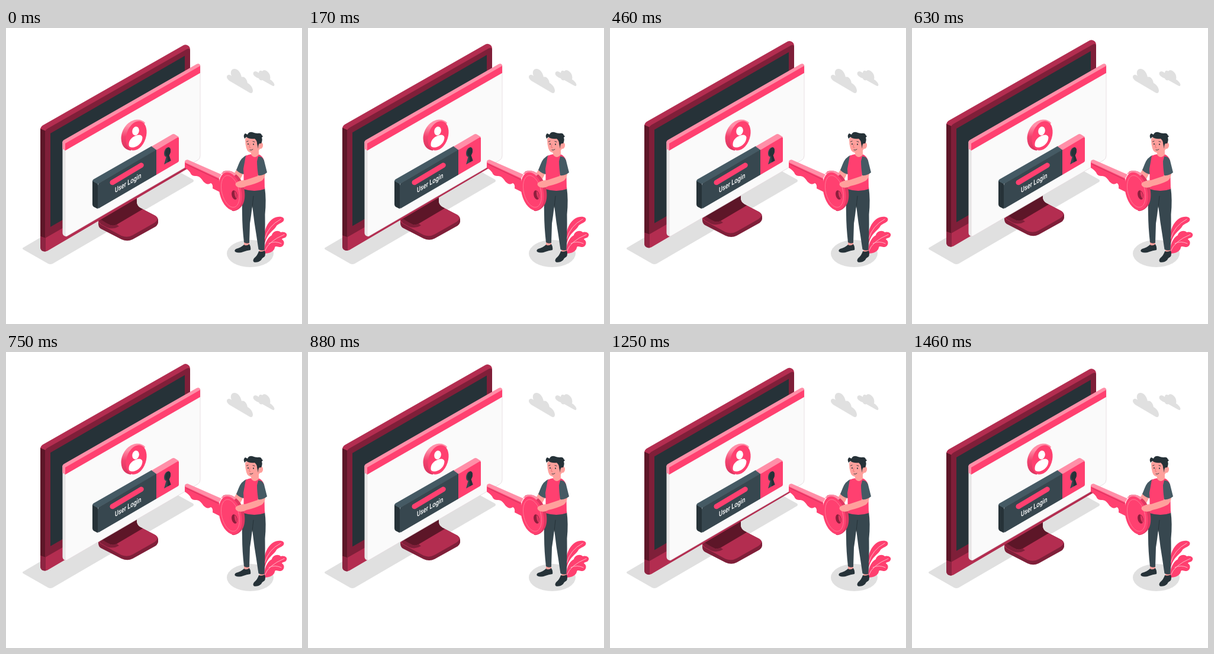
Recreate the animation shown at these times as an HTML page. Size 500 px wide and 500 px high, loop 1500 ms.

```html
<!DOCTYPE html>
<html lang="en">
<head>
<meta charset="utf-8">
<title>User Login</title>
<style>
html, body { margin: 0; width: 100%; height: 100%; overflow: hidden; background: #fff; }
svg { display: block; width: 100vw; height: 100vh; }
.pink { fill: #ff4070; }
.light { fill: #ff8fa8; }
.deep { fill: #b32d50; }
.frame { fill: #7f1f39; }
.wine { fill: #5d1628; }
.ink { fill: #263238; }
.slate { fill: #37474f; }
.grey { fill: #e0e0e0; }
.skin { fill: #ffa09c; }
.white { fill: #fff; }
.line { fill: none; stroke-linecap: round; stroke-linejoin: round; }
text { font: 500 12.5px Roboto, Arial, sans-serif; fill: #fff; }
</style>
</head>
<body>
<svg viewBox="0 0 500 500">
  <defs>
    <linearGradient id="rim" x1="0" y1="0" x2="0" y2="1">
      <stop offset=".2" stop-color="#ff8fa8"/>
      <stop offset=".55" stop-color="#f2426e"/>
      <stop offset="1" stop-color="#d9345f"/>
    </linearGradient>
  </defs>

  <!-- ground shadows -->
  <path class="grey" d="M29 371L58 354L278 235L316 256Q318 258 316 260L79 398Q75 400 71 398L29 374Q27 372.500 29 371Z"/>
  <ellipse class="grey" cx="412.500" cy="381" rx="39.500" ry="23"/>

  <!-- clouds -->
  <g class="grey">
    <path d="M374 80C376 78 379 79 381 81C378 74 381 68 387 69C393 70 397 77 398 83C402 81 407 86 408 93C413 95 417 101 417 106C417 110 414 111 411 109L377 89C373 86 372 82 374 80Z"/>
    <path d="M418 75C420 72 424 73 427 76C427 72 430 71 433 73C435 70 440 71 443 75C446 78 447 83 446 87C450 89 453 93 453.500 96C453 99 451 98 449 97L433 88C431 89 428 88 427 85C421 83 416 79 418 75Z"/>
  </g>

  <g id="monitor">
    <!-- stand -->
    <path class="frame" d="M156 325L221 288V297Q222 302 229 305L252 317Q257 320 257 325V329Q256 334 250 337L214 357Q205 361.500 195 357L160 339Q156 336 156 331Z"/>
    <path class="deep" d="M156 325L221 288V297Q222 302 229 305L252 317Q260 322 251 329L214 350Q205 355 195 351L160 332Q155 329 156 325Z"/>
    <path class="wine" d="M156 325L221 287V296Q222 302 231 306L187 332Q180 336 172 331L160 325Z"/>
    <path class="frame" d="M156 325L161 324L172 331Q180 336 187 332L191 335Q181 341 171 337L160 331Z"/>
    <!-- casing -->
    <path class="deep" d="M58 172Q58 167 62 164.500L300 29Q304 27 308 30Q311 32 311 37V235L70 376.500Q65 379 61 376Q58 374 58 370Z"/>
    <path class="wine" d="M58 170L67 174V355L58 352Z"/>
    <path d="M58 352L67 355V377.500Q58 378 58 370Z" fill="#8d2441"/>
    <path class="frame" d="M66 175Q66.500 172 70 170L305 36Q311 33 311 39V215L66 355Z"/>
    <path class="ink" d="M75 178L302 47V205L75 336Z"/>
  </g>

  <!-- window -->
  <path d="M95.500 192L101 194V352Q95.500 351 95.500 346Z" fill="#e9e9e9"/>
  <path d="M100 194L328 63V216Q328 221 324 223L103 351.500Q100 353 100 349Z" fill="#fafafa" stroke="#e3d9dc" stroke-width=".8"/>
  <path class="light" d="M95.500 192Q96 190 98 189L322 61Q326 59 328 62.500V66L100 207L95.500 204Z"/>
  <path class="pink" d="M100 195L328 64V76L100 207Z"/>

  <!-- account badge -->
  <path fill="url(#rim)" d="M194.500 187C194 173 205 157 219 155C226 154 231 156 235 160L211 207C203 206 195 201 194.500 187Z"/>
  <ellipse class="pink" cx="220" cy="182" rx="16.500" ry="25.500" transform="rotate(18 220 182)"/>
  <ellipse class="white" cx="219" cy="174" rx="5.700" ry="7.500" transform="rotate(15 219 174)"/>
  <path class="white" d="M207.500 198C207 190 212 185 218 182.500C224 179 230 180 230.500 185C230 193 225 198 219 200.500C214 203 208 202 207.500 198Z"/>

  <!-- login field -->
  <path class="ink" d="M146 258L155 263V305.500L148 302Q146 300.500 146 298Z"/>
  <path d="M146 258.500Q146 257 148 255.500L246 199.500L255 205.500L155 263.500Z" fill="#455a64"/>
  <path class="slate" d="M155 266Q155 263.500 157 262L254 205.500V248L157 304.500Q155 305.500 155 303Z"/>
  <path class="light" d="M246 200L281 179.500Q283 178.500 285 179.500L292 184L254 206Z"/>
  <path class="pink" d="M254 206L289.500 185Q292 183.500 292 186.500V224Q292 226 290 227L254 248Z"/>
  <path class="slate" d="M267 212C267 206 271 201 275 201.500C279 203 279 210 275.500 215L278.500 224L267 230.500L270.500 218C268 217 267 215 267 212Z"/>
  <path class="ink" d="M269 211C269 206 272 202 275 201.500C279 203 279 210 275.500 215L278.500 224L273 227L272.500 217C270 216 269 214 269 211Z"/>
  <path class="line" d="M179.700 261L228.500 231.800" stroke="#ff4070" stroke-width="8.500"/>
  <text transform="matrix(.74 -.43 0 1 184 278.500)">User Login</text>

  <!-- plant -->
  <path class="pink" d="M436 367C434 349 438 331 451 322C459 317 469 318 469.500 323C470 329 460 330 457 334C454 341 443 345 438 361Z"/>
  <path class="pink" d="M436 381C435 367 441 354 449 350C450 344 459 340 464 345C470 343 476 347 474 351C472 356 467 354 466 357C472 360 470 369 464 370C458 370 455 367 454 371C453 377 446 381 436 381Z"/>
  <g class="line" stroke="#ffc2cf" stroke-width=".9">
    <path d="M437 356Q443 334 464 323M437 377Q443 360 470 349M444 364Q454 359 465 364"/>
  </g>

  <!-- legs and shoes -->
  <path class="skin" d="M402 360H411V370H402ZM428 371H436V381H428Z"/>
  <path class="ink" d="M402 366Q406 369 411 365Q414 370 413 375Q406 376 401 378Q393 381 387 378Q385 375 389 373Q397 371 402 366Z"/>
  <path class="ink" d="M427 377Q432 379 437 376Q439 381 437 386Q433 388 431 392Q425 397 419 395.500Q416 393 419 389Q425 384 427 377Z"/>
  <path class="slate" d="M401 270L437 269Q440 290 437.500 315Q438 347 436.500 375Q431 377 426.500 374Q423 350 419.500 328L416 300Q414 318 412 330L411 363Q406 365 402 362Q399 335 399 315Q398 290 401 270Z"/>
  <path class="line" d="M418 284Q417 292 416 303" stroke="#263238" stroke-width="1"/>

  <!-- far arm -->
  <path class="skin" d="M391 236L402 243L395 257Q390 262 385 257Q382 250 386 245Z"/>
  <path d="M406 215Q397 219 393 230L389 240Q395 246 402 247L408 229Z" fill="#455a64"/>

  <!-- body -->
  <path class="pink" d="M405 216Q413 212 426 213Q434 216 436 224L437 272Q420 278 401 272Q402 248 401 238Z"/>
  <path class="skin" d="M414 204L427 201V214Q420 222 414 214Z"/>

  <!-- head -->
  <path class="skin" d="M404 188Q406 182 417 182L430 188Q432 194 434 196Q435 202 429 204Q425 211 417 211Q408 211 406 203Q404 196 404 188Z"/>
  <path class="ink" d="M403 187Q400 181 404 178L408 180Q410 175 416 176Q421 178 425 178Q431 177 432 181L434 183L432 185Q434 190 430 197L428 195Q426 198 426 204L424 195Q424 190 420 187Q411 188 406 184Z"/>
  <ellipse class="skin" cx="430" cy="199.500" rx="3.600" ry="4.600"/>
  <g class="ink">
    <ellipse cx="409" cy="196" rx=".9" ry="1.300"/>
    <ellipse cx="418" cy="196.500" rx=".9" ry="1.300"/>
  </g>
  <g class="line" stroke="#263238" stroke-width=".9">
    <path d="M406.500 192L409 191M417 191.500L420 192.500M412 206Q415 207 417 205"/>
  </g>
  <path class="line" d="M412 196L410.800 201.500L413 202" stroke="#e56f72" stroke-width=".9"/>

  <!-- key -->
  <path class="light" d="M302 225Q303 222 307 222.500L364 247.500L359 256L302 230Z"/>
  <path class="pink" d="M302 227L360 254L363 278L349 271Q350 264 346 262Q342 265 338 263Q333 260 331 256Q326 249 320 250Q314 250 312 246Q310 241 302 236Z"/>
  <path class="line" d="M304 230L359 256" stroke="#c92f58" stroke-width=".9"/>
  <path d="M366 243C374 238 387 242 395 254C404 266 406 288 400 298C396 305 389 310 382 309Z" fill="#df3862"/>
  <path class="light" d="M363 246C370 239 381 240 389 247L383 252Z"/>
  <ellipse class="pink" cx="379" cy="276" rx="18.500" ry="33" transform="rotate(-14 379 276)"/>
  <ellipse class="line" cx="379" cy="276" rx="14.500" ry="27.500" transform="rotate(-14 379 276)" stroke="#ff7895" stroke-width=".9"/>
  <ellipse cx="386" cy="282" rx="4.700" ry="8" transform="rotate(-14 386 282)" fill="#8e1f3d"/>
  <path d="M386 275Q392 280 390 289Q385 284 386 275Z" fill="#df3862"/>

  <!-- near arm -->
  <path class="skin" d="M427 243L438 246Q437 254 432 258Q420 264 406 267Q400 271 392 269Q386 266 388 262Q394 257 404 257L425 250Z"/>
  <path d="M426 217Q433 216 436 224L441 244Q434 250 426 249Q424 235 424 225Z" fill="#455a64"/>
</svg>
<script>
const LOOP = 1500, LEAD = 45, LIFT = 8.2;
const monitor = document.getElementById("monitor");

function draw(ms) {
  const phase = (ms + LEAD) % LOOP / LOOP;
  const y = -LIFT * (1 - Math.cos(phase * 2 * Math.PI)) / 2;
  monitor.setAttribute("transform", `translate(0 ${y.toFixed(3)})`);
}

const start = performance.now();
function tick() {
  draw(performance.now() - start);
  requestAnimationFrame(tick);
}
tick();
</script>
</body>
</html>
```
